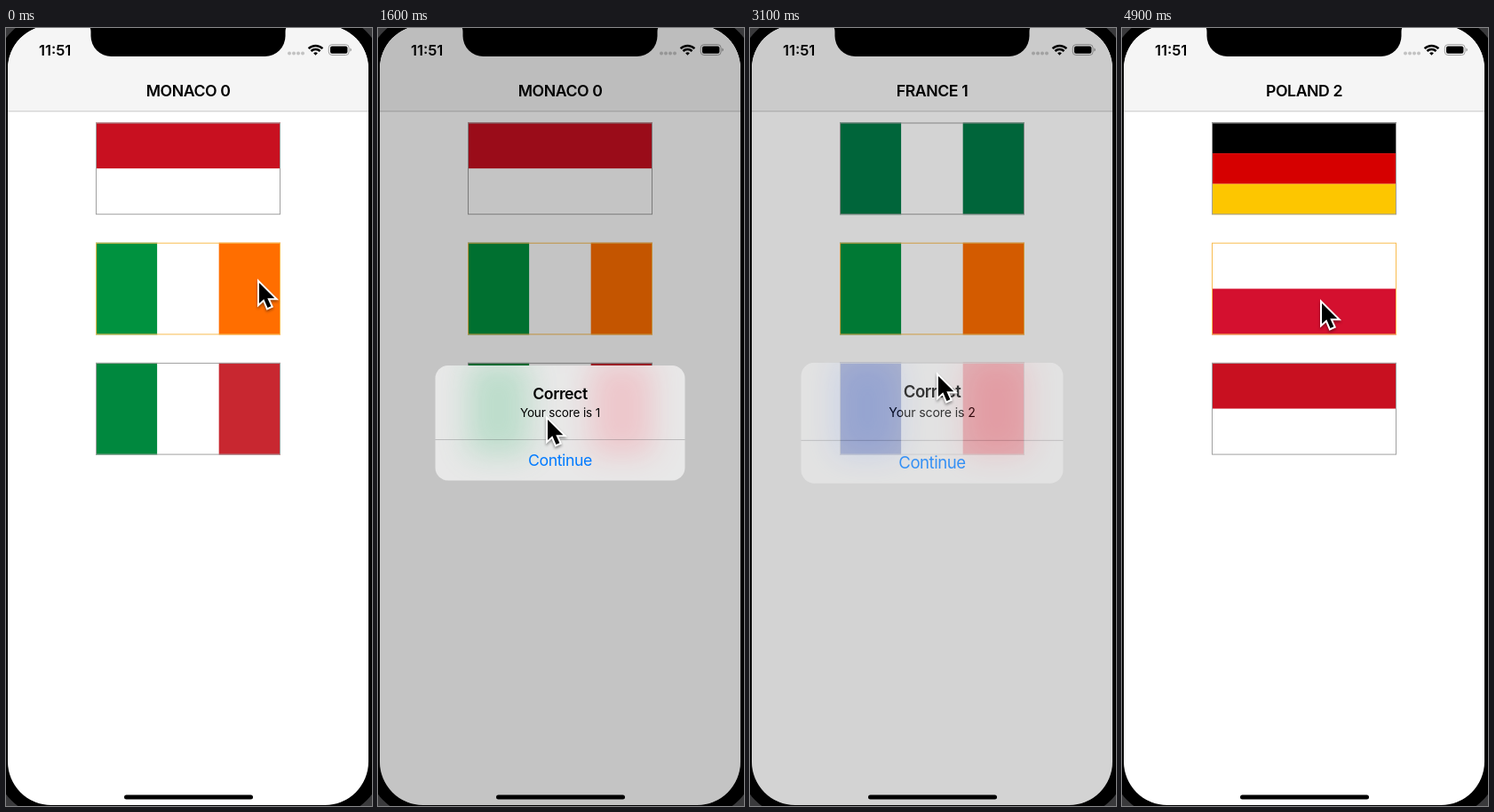
Recreate the animation shown at these times as an HTML page. Size 412 px wide and 876 px high, loop 5 s.

```html
<!DOCTYPE html>
<html lang="en">
<head>
<meta charset="utf-8">
<title>Flag quiz</title>
<style>
  html, body { margin: 0; width: 100%; height: 100%; overflow: hidden; background: #000; }
  svg { display: block; width: 412px; height: 876px; }
  text { font-family: Inter, sans-serif; font-size: 17.7px; letter-spacing: -.025em; text-anchor: middle; }
  .bold { font-weight: 600; }
  #clock { font-size: 16.5px; letter-spacing: 0; text-anchor: start; }
  #message { font-size: 13.5px; letter-spacing: -.01em; }
  #cursor { filter: drop-shadow(0 2px 1.5px rgba(0, 0, 0, .4)); }
</style>
</head>
<body>
<svg viewBox="0 0 412 876">
  <defs>
    <clipPath id="screen"><rect x="2" y="-3" width="406" height="878" rx="49"/></clipPath>
    <clipPath id="card"><rect x="64.5" y="380" width="281" height="129.5" rx="14.5"/></clipPath>
    <filter id="blur" x="-60%" y="-60%" width="220%" height="220%"><feGaussianBlur stdDeviation="17"/></filter>
  </defs>

  <rect width="412" height="876" fill="#3a3a3c"/>
  <rect x="-12" y="-14" width="436" height="902" rx="62"/>

  <g clip-path="url(#screen)">
    <rect width="412" height="876" fill="#fff"/>
    <rect width="412" height="93.5" fill="#f5f5f5"/>
    <rect y="93.3" width="412" height="1" fill="#c8c8c8"/>
    <text id="clock" class="bold" x="37" y="31">11:51</text>
    <g fill="#c2c2c2">
      <circle cx="319" cy="28.6" r="2"/><circle cx="324" cy="28.6" r="2"/>
      <circle cx="329" cy="28.6" r="2"/><circle cx="334" cy="28.6" r="2"/>
    </g>
    <g fill="none" stroke="#000" stroke-width="2.5">
      <path d="M340.6 23.1a11.4 11.4 0 0 1 15.8 0M343.4 26a7.3 7.3 0 0 1 10.2 0"/>
      <path d="M348.5 30.8l-2.4-2.5a3.5 3.5 0 0 1 4.8 0z" fill="#000" stroke="none"/>
    </g>
    <rect x="363.3" y="18.7" width="22.8" height="11.8" rx="3.6" fill="none" stroke="#a0a0a0"/>
    <rect x="365" y="20.4" width="19.4" height="8.4" rx="2" fill="#000"/>
    <path d="M387.3 22.6q1.6.6 1.6 2t-1.6 2z" fill="#a0a0a0"/>
    <text id="title" class="bold" x="205" y="77.3"></text>
    <g id="flags"></g>
    <rect id="dim" width="412" height="876"/>
    <path d="M89-3Q95.5-3 95.5 4V9A23 23 0 0 0 118.5 32H291.500A23 23 0 0 0 314.500 9V4Q314.500-3 321-3Z"/>
    <rect x="133" y="863.5" width="145" height="5" rx="2.5"/>
    <g id="alert">
      <g clip-path="url(#card)">
        <rect x="64" y="380" width="282" height="130" fill="#e8e8e8"/>
        <g filter="url(#blur)" opacity=".25">
          <rect id="glow" x="101" y="377" width="69.3" height="103.500"/>
          <rect x="239.700" y="377" width="69.3" height="103.500" fill="#ff6678"/>
        </g>
        <rect x="64" y="463" width="282" height=".8" fill="#3c3c43" fill-opacity=".32"/>
      </g>
      <text class="bold" x="205" y="417.8">Correct</text>
      <text id="message" x="205" y="438.5"></text>
      <text x="205" y="493.5" fill="#007aff">Continue</text>
    </g>
  </g>

  <path id="cursor" d="M2 5V28L7.300 23.200L11.500 33L15.400 31.300L11.300 22.300H19.300Z"
        fill="#000" stroke="#fff" stroke-width="4" paint-order="stroke"/>
</svg>

<script>
const LOOP = 5000, TICK = 100;
const $ = id => document.getElementById(id);

const WHITE = '#fff';
const flag = (dir, ...colors) => ({ dir, colors });
const monaco = flag('rows', '#c81020', WHITE);
const ireland = flag('columns', '#00923f', WHITE, '#ff6e00');

const rounds = [
  { from: 0, title: 'MONACO 0', glow: '#3cbe78',
    flags: [monaco, ireland, flag('columns', '#00883e', WHITE, '#c82730')] },
  { from: 2600, title: 'FRANCE 1', glow: '#6c96ff',
    flags: [flag('columns', '#007a46', WHITE, '#007a46'), ireland,
            flag('columns', '#001e96', WHITE, '#ed2436')] },
  { from: 4500, title: 'POLAND 2', glow: WHITE,
    flags: [flag('rows', '#000', '#d60000', '#fdc600'), flag('rows', WHITE, '#d4102f'), monaco] }
];

const alerts = [{ open: 900, close: 2162 }, { open: 2982, close: 4019 }];

// Cursor stops: time, x, y
const path = [
  [0, 283, 282], [600, 195, 171], [1200, 195, 171], [1600, 189, 436], [1900, 204, 482],
  [2300, 204, 482], [2700, 210, 387], [3300, 210, 387], [3800, 209, 487],
  [4200, 209, 487], [4800, 223, 305], [LOOP, 223, 305]
];

const rect = (x, y, w, h, attrs) =>
  `<rect x="${x}" y="${y}" width="${w}" height="${h}" ${attrs}/>`;

function drawFlag({ dir, colors }, row) {
  const x = 101, y = 106.5 + row * 135.2, w = 208, h = 103.7, n = colors.length;
  const stripes = colors.map((c, i) => dir === 'rows'
    ? rect(x, y + i * h / n, w, h / n, `fill="${c}"`)
    : rect(x + i * w / n, y, w / n, h, `fill="${c}"`));
  const border = row === 1 ? '#f8bc50' : '#a0a0a0';
  return stripes.join('') + rect(x + .5, y + .5, w - 1, h - 1, `fill="none" stroke="${border}"`);
}

// Critically damped spring from 0 to 1
function spring(ms) {
  if (ms < 20) return 0;
  const k = ms * .02285;
  return 1 - (1 + k) * Math.exp(-k);
}

const ease = u => u * u * (3 - 2 * u);

function cursorAt(t) {
  const i = path.findIndex(stop => stop[0] > t);
  const [t0, x0, y0] = path[i - 1], [t1, x1, y1] = path[i];
  const u = ease((t - t0) / (t1 - t0));
  return [x0 + (x1 - x0) * u, y0 + (y1 - y0) * u];
}

let shownRound = -1;
function showRound(index) {
  if (index === shownRound) return;
  shownRound = index;
  const { title, glow, flags } = rounds[index];
  $('title').textContent = title;
  $('message').textContent = `Your score is ${index + 1}`;
  $('glow').setAttribute('fill', glow);
  $('flags').innerHTML = flags.map(drawFlag).join('');
}

function showAlert(t) {
  const { open, close } = alerts[t < 2800 ? 0 : 1];
  const shown = spring(t - open);
  const alpha = shown * (1 - spring(t - close));
  const scale = 1.2 - .2 * shown;
  $('dim').setAttribute('opacity', .23 * alpha);
  $('alert').setAttribute('opacity', alpha < .005 ? 0 : alpha);
  $('alert').setAttribute('transform', `translate(205 444.8) scale(${scale}) translate(-205 -444.8)`);
}

function render(now) {
  const t = Math.floor(now % LOOP / TICK) * TICK;
  showRound(rounds.filter(r => r.from <= t).length - 1);
  showAlert(t);
  $('cursor').setAttribute('transform', `translate(${cursorAt(t)})`);
}

const start = performance.now();
function frame() {
  render(performance.now() - start);
  requestAnimationFrame(frame);
}
frame();
</script>
</body>
</html>
```
